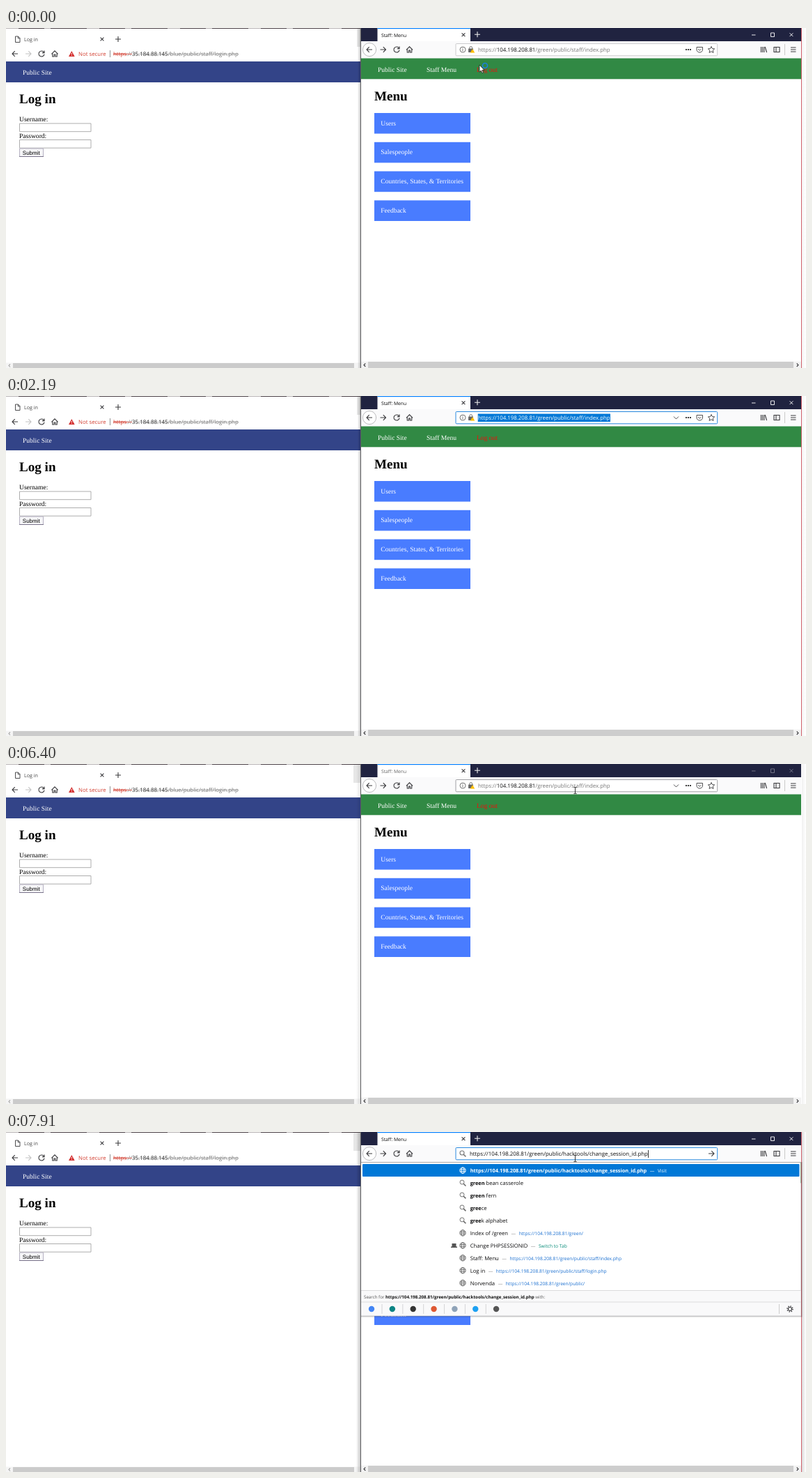
Animation of 1149x488 px, one loop 8 s. Source, as an HTML page:

```html
<!DOCTYPE html>
<html lang="en">
<head>
<meta charset="utf-8">
<title>Two browsers</title>
<style>
html, body { margin: 0; width: 100%; height: 100%; overflow: hidden; background: #fff }
svg { display: block; position: absolute; left: 0; top: 0 }
text { white-space: pre; text-rendering: geometricPrecision; font: 7.85px "Open Sans", "Noto Sans", sans-serif; fill: #0c0c0d }
.page text { font: 9.56px "Liberation Serif", "Times New Roman", serif; fill: #000 }
.page .h1 { font-size: 19.1px; font-weight: bold }
.page .w { fill: #fff }
.page .btn { font: 8px "Liberation Sans", Arial, sans-serif }
.dim { fill: #777 }
.ic { fill: none; stroke: #3a3a3d; stroke-width: 1.1 }
</style>
</head>
<body>
<svg width="1149" height="488" viewBox="0 0 1149 488">
<defs>
  <linearGradient id="edge"><stop offset="0" stop-opacity="0"/><stop offset="1" stop-opacity=".22"/></linearGradient>
  <linearGradient id="edgeR"><stop offset="0" stop-opacity=".14"/><stop offset="1" stop-opacity="0"/></linearGradient>
  <path id="back" d="M4-.01H-4M-.3-3.8L-4 0L-.3 3.8"/>
  <path id="reload" d="M3.4-2.2A4 4 0 1 0 4 .6M4-4.4V-1.4H1"/>
  <path id="home" d="M-4.6 .3L0-4.2L4.6 .3M-3.2-.6V4H-.9V1H.9V4H3.2V-.6"/>
  <path id="cross" d="M-2.4-2.4L2.4 2.4M2.4-2.4L-2.4 2.4"/>
  <path id="plus" d="M-4 0H4M0-4V4"/>
  <g id="globe"><circle r="4.2"/><ellipse rx="1.9" ry="4.2"/><path d="M-4 -1.3H4M-4 1.3H4"/></g>
  <g id="lens"><circle cx="-1" cy="-1" r="3"/><path d="M1.2 1.2L4.4 4.4" stroke-width="1.5"/></g>
</defs>
<rect width="1149" height="488" fill="#fff"/>

<!-- left browser -->
<path d="M0 .5H509" stroke="#4b4247"/>
<path d="M0 .5H509" stroke="#b9b4b6" stroke-dasharray="18 37 9 52"/>
<g class="ic" stroke="#5f6368">
  <path d="M13.5 12H17.5L20 14.5V20.5H13.5ZM17.3 12V14.8H20" stroke-width=".9"/>
  <use href="#cross" x="138" y="16"/><use href="#plus" x="161" y="16"/>
  <use href="#back" x="13" y="37"/>
  <use href="#back" transform="translate(32 37) scale(-1 1)" style="stroke:#c4c4c4"/>
  <use href="#reload" x="51" y="37"/><use href="#home" x="70" y="37"/>
  <path d="M149.5 32V42" style="stroke:#999"/>
</g>
<text x="26" y="18.8" style="font-size:7.15px;fill:#444">Log in</text>
<path d="M94.3 33L98.7 41H90Z" fill="#d32f2f"/><path d="M94.3 35.8V38.2M94.3 39V40" stroke="#fff" stroke-width=".9"/>
<text x="104" y="39.8" style="fill:#d23f31">Not secure</text>
<text x="154" y="39.8" style="font-size:7.93px" class="dim"><tspan fill="#d23f31" text-decoration="line-through">https</tspan><tspan>://</tspan><tspan fill="#222">35.184.88.145</tspan>/blue/public/staff/login.php</text>
<path d="M154 37.4H181" stroke="#d23f31" stroke-width=".8"/>
<path d="M182 37.4H334" stroke="#777" stroke-width=".5"/>
<g class="page">
  <rect y="48" width="509.5" height="30" fill="#334488"/>
  <text class="w" x="24" y="66.7">Public Site</text>
  <text class="h1" x="19" y="108.3">Log in</text>
  <text x="19" y="134.4">Username:</text><text x="19" y="157.9">Password:</text>
  <g fill="#fff" stroke="#adadad"><path d="M19.5 137H122V148.7H19.5ZM19.5 160.5H122V172.2H19.5Z"/>
  <path d="M19.5 173H53.5V184.5H19.5Z" fill="#f6f6f8" stroke="#b5b0c2"/></g>
  <path d="M19 184.5H54" stroke="#777189"/>
  <text class="btn" x="23.8" y="181.5">Submit</text>
</g>
<rect y="480.5" width="509" height="8" fill="#f4f4f4"/><rect x="10" y="481" width="490" height="7" fill="#cbcbcb"/>
<path d="M6 482.5L4 484.6L6 486.7" class="ic" style="stroke:#aaa"/>
<rect id="corner" y="1" height="26" fill="#e6e6e6"/>
<rect id="shade" y="1" height="487" fill="url(#edge)"/>

<!-- right browser -->
<rect x="509" width="1" height="488" fill="#5d5d60"/>
<rect x="510" width="632" height="488" fill="#fff"/>
<rect x="510" width="632" height="19" fill="#202340"/>
<rect x="533.5" width="133.5" height="19" fill="#fff"/><rect x="533.5" width="133.5" height="1.2" fill="#0a84ff"/>
<text id="tab" x="539" y="12.6" style="font-size:6.75px">Staff: Menu</text>
<use href="#cross" x="657" y="9.7" class="ic"/>
<use href="#plus" x="677" y="9.2" class="ic" style="stroke:#eee"/>
<g id="winButtons" class="ic" style="stroke:#fff;stroke-width:.9"><path d="M1071 10H1076.5M1098.5 7H1103.5V12.5H1098.5Z"/><use href="#cross" x="1128" y="9.7"/></g>
<rect x="510" y="19" width="632" height="24.5" fill="#fafafb"/>
<g class="ic">
  <circle cx="522" cy="31" r="9.6" fill="#fff" style="stroke:#b4b4b6;stroke-width:.9"/>
  <use href="#back" x="522" y="31"/><use href="#back" transform="translate(541.5 31) scale(-1 1)"/>
  <use href="#reload" x="561" y="31"/><use href="#home" x="579.5" y="31"/>
  <path d="M1084.5 27V35M1086.7 27V35M1088.9 27V35M1090.2 27L1092.6 35M1103 27.5H1111V34.5H1103ZM1106 27.5V34.5M1127 28H1134.5M1127 31H1134.5M1127 34H1134.5"/>
  <path d="M1118.5 23V39" style="stroke:#ccc"/>
</g>
<rect id="field" x="646" y="22.5" width="375.7" height="17.3" rx="1.2" fill="#fff"/>
<g id="idle">
  <g class="ic" style="stroke:#666;stroke-width:.9">
    <circle cx="656" cy="31" r="4"/><path d="M656 30.2V33.3M656 28.4V29.5"/>
    <path d="M665.8 30V28.5A1.9 1.9 0 0 1 669.6 28.5V30"/>
    <rect x="664.6" y="30" width="6" height="4.5" fill="#666"/>
    <path d="M965 29.5" />
  </g>
  <path d="M670 30L673.3 35.6H666.8Z" fill="#ffbf00"/>
  <path d="M976 31H977.9M979 31H980.9M982 31H983.9" stroke="#333" stroke-width="1.9"/>
  <g class="ic" style="stroke-width:.9">
    <path d="M992 27.5H1000.5V31A4.25 4 0 0 1 992 31ZM994 30L996.3 32.2L998.6 30"/>
    <path d="M1013 26.5L1014.4 29.6L1017.7 29.9L1015.2 32.1L1016 35.4L1013 33.7L1010 35.4L1010.8 32.1L1008.3 29.9L1011.6 29.6Z"/>
    <path id="chevron" d="M959 29.5L962.5 33L966 29.5"/>
  </g>
  <rect id="selection" x="677.7" y="25.5" width="190.3" height="11.5" fill="#0078d7"/>
  <text id="url" x="678" y="34.2">https://<tspan id="host">104.198.208.81</tspan>/green/public/staff/index.php</text>
</g>
<g class="page">
  <rect x="510" y="43.5" width="632" height="29.8" fill="#318944"/>
  <text class="w" x="534" y="62.6">Public Site</text><text class="w" x="604" y="62.6">Staff Menu</text>
  <text x="676" y="62.6" style="fill:#f00f0c">Log out</text>
  <text class="h1" x="529" y="104">Menu</text>
  <g id="menu"></g>
</g>
<rect x="510" y="478.7" width="632" height="9.3" fill="#f2f2f2"/><rect x="520" y="479" width="611" height="9" fill="#cdcdcd"/>
<path d="M516.3 481.5L514 483.7L516.3 486M1135.7 481.5L1138 483.7L1135.7 486" class="ic"/>
<rect x="1142" width="7" height="488" fill="#fff"/>
<rect id="shadeR" x="1143" width="6" height="488" fill="url(#edgeR)"/>
<rect id="redEdge" x="1142" width="1" height="488" fill="#d0616b"/>

<!-- address suggestions -->
<g id="drop">
  <rect x="510" y="43" width="633.5" height="222.5" fill="#000" opacity=".22"/>
  <rect x="510" y="43" width="631.5" height="221" fill="#fff"/>
  <path d="M510 43.5H1141.5" stroke="#aaa"/>
  <rect x="512" y="46" width="627.5" height="18" rx="1" fill="#0078d7"/>
  <g id="rows"></g>
  <path d="M640.5 160H646.5V164.5H648V166H639V164.5H640.5Z" fill="#555"/>
  <rect x="510" y="227.5" width="631.5" height="36.5" fill="#f9f9fa"/>
  <path d="M510 227.5H1141.5M510 244H1141.5M510 263.8H1141.5" stroke="#d4d4d6" stroke-width=".8"/>
  <text x="514" y="238.6" style="font-size:6.2px;fill:#555">Search for <tspan font-weight="bold" fill="#111">https://104.198.208.81/green/public/hacktools/change_session_id.php</tspan> with:</text>
  <g id="engines"></g>
  <path d="M1110.5 247V261" stroke="#ccc"/>
  <g class="ic"><circle cx="1126" cy="254" r="2.5"/><circle cx="1126" cy="254" r="4" stroke-width="1.6" stroke-dasharray="1.3 1.84"/></g>
  <use href="#lens" x="656" y="31" class="ic" style="stroke:#777"/>
  <text x="666" y="34.2">https://104.198.208.81/green/public/hacktools/change_session_id.php</text>
  <path d="M922.5 26V37" stroke="#000" stroke-width=".8"/>
  <use href="#back" transform="translate(1013 31) scale(-1 1)" class="ic"/>
</g>
<path id="caret" d="M817.5 25.5V37" stroke="#000"/>

<g id="arrow">
  <path d="M0 0V10.2L2.3 8.1L3.9 11.7L5.5 11L3.9 7.5H7Z" fill="#fff" stroke="#111" stroke-width=".7"/>
  <circle cx="8" cy="1" r="3.5" fill="none" stroke="#1b7fe0" stroke-width="1.6"/>
</g>
<path id="beam" d="M-2-4.6H-.5L0-4.2L.5-4.6H2M0-4.2V4.2M-2 4.6H-.5L0 4.2L.5 4.6H2" fill="none" stroke="#222" stroke-width=".9"/>
</svg>
<script>
const $ = id => document.getElementById(id);
const show = (id, on) => $(id).style.display = on ? '' : 'none';
const LOOP = 8000;
const site = 'https://104.198.208.81/green/';

$('menu').innerHTML = ['Users', 'Salespeople', 'Countries, States, &amp; Territories', 'Feedback'].map((label, i) => {
  const y = 122 + i * 41.8;
  return `<rect x="529" y="${y}" width="138" height="29.6" fill="#497cff"/><text class="w" x="538.3" y="${y + 17.6}">${label}</text>`;
}).join('');

// bold start, rest of the title, note after the dash
const rows = [
  [site + 'public/hacktools/change_session_id.php', '', 'Visit'],
  ['green', ' bean casserole'], ['green', ' fern'], ['gree', 'ce'], ['gree', 'k alphabet'],
  ['', 'Index of /green', site],
  ['', 'Change PHPSESSIONID', 'Switch to Tab'],
  ['', 'Staff: Menu', site + 'public/staff/index.php'],
  ['', 'Log in', site + 'public/staff/login.php'],
  ['', 'Norvenda', site + 'public/']
];
$('rows').innerHTML = rows.map(([bold, rest, note], i) => {
  const y = 55.4 + i * 17.95;
  const ink = i ? '#0c0c0d' : '#fff';
  const noteInk = i == 0 ? '#fff' : i == 6 ? '#058b78' : '#1a6fd0';
  const tail = note ? `<tspan dx="4.5" font-size="6.65" fill="${i ? '#888' : '#fff'}">—</tspan><tspan dx="4.5" font-size="6.65" fill="${noteInk}">${note}</tspan>` : '';
  return `<use href="#${note ? 'globe' : 'lens'}" x="656" y="${y - .3}" class="ic" style="stroke:${i ? '#666' : '#fff'};stroke-width:.9"/>
    <text x="666.7" y="${y + 2.9}" style="font-size:7.7px;fill:${ink}"><tspan font-weight="bold" font-size="7.35">${bold}</tspan>${rest}${tail}</text>`;
}).join('');

$('engines').innerHTML = ['#4285f4', '#0c8484', '#333', '#de5833', '#8fa3b8', '#1da1f2', '#555'].map((color, i) => {
  const x = 525 + i * 29.85;
  const line = i < 6 ? `<path d="M${x + 15} 247V261" stroke="#d4d4d6"/>` : '';
  return `<circle cx="${x}" cy="254" r="4.2" fill="${color}"/>` + line;
}).join('');

// pointer steps: start time, shape, x, y
const pointer = [
  [0, 'arrow', 680, 53], [150, 'beam', 775, 39], [270, 'beam', 858, 24], [410, 'beam', 860, 30],
  [540, 'beam', 862, 35], [950, 'arrow', 910, 52], [1070, 'arrow', 948, 59], [1220, 'arrow', 936, 61],
  [2190, ''], [5740, 'arrow', 1132, 171], [5890, 'arrow', 1040, 118], [6010, 'arrow', 935, 72],
  [6135, 'beam', 855, 36], [6260, 'beam', 817.5, 38], [6640, ''], [7660, 'beam', 817.5, 38]
];

function draw(t) {
  const between = (a, b) => t >= a && t < b;
  const active = !between(3870, 6520);
  const editing = between(810, 3870) || t >= 6640;
  const selected = between(810, 3870) || t >= 7510;
  const hover = between(150, 810) || between(6260, 6640);
  const typed = t >= 7910;

  const early = t < 3870;
  const corner = $('corner'), shade = $('shade');
  corner.setAttribute('x', early ? 504 : 499);
  corner.setAttribute('width', early ? 5 : 10);
  shade.setAttribute('x', early ? 505 : 503);
  shade.setAttribute('width', early ? 4 : 6);
  shade.setAttribute('opacity', active ? 1 : .45);
  show('redEdge', active);
  $('shadeR').setAttribute('opacity', early ? .3 : active ? 1 : .4);
  $('winButtons').setAttribute('opacity', active ? 1 : .4);
  $('tab').style.fill = active ? '#0c0c0d' : '#666';

  $('field').setAttribute('stroke', editing ? '#2a8ae0' : hover ? '#a0a0a4' : '#cbcbcd');
  show('idle', !typed);
  show('drop', typed);
  show('selection', selected);
  $('url').style.fill = selected ? '#fff' : editing ? '#0c0c0d' : '#777';
  $('host').style.fill = selected ? '#fff' : '#0c0c0d';
  show('chevron', between(150, 4000) || t >= 6260);
  $('chevron').setAttribute('opacity', between(3870, 4000) ? .4 : 1);
  show('caret', between(6640, 6920));

  const [, shape, x, y] = pointer.findLast(p => p[0] <= t);
  for (const id of ['arrow', 'beam']) show(id, id == shape);
  if (shape) $(shape).setAttribute('transform', `translate(${x} ${y})`);
}

function tick() {
  draw(performance.now() % LOOP);
  requestAnimationFrame(tick);
}
tick();
</script>
</body>
</html>
```
